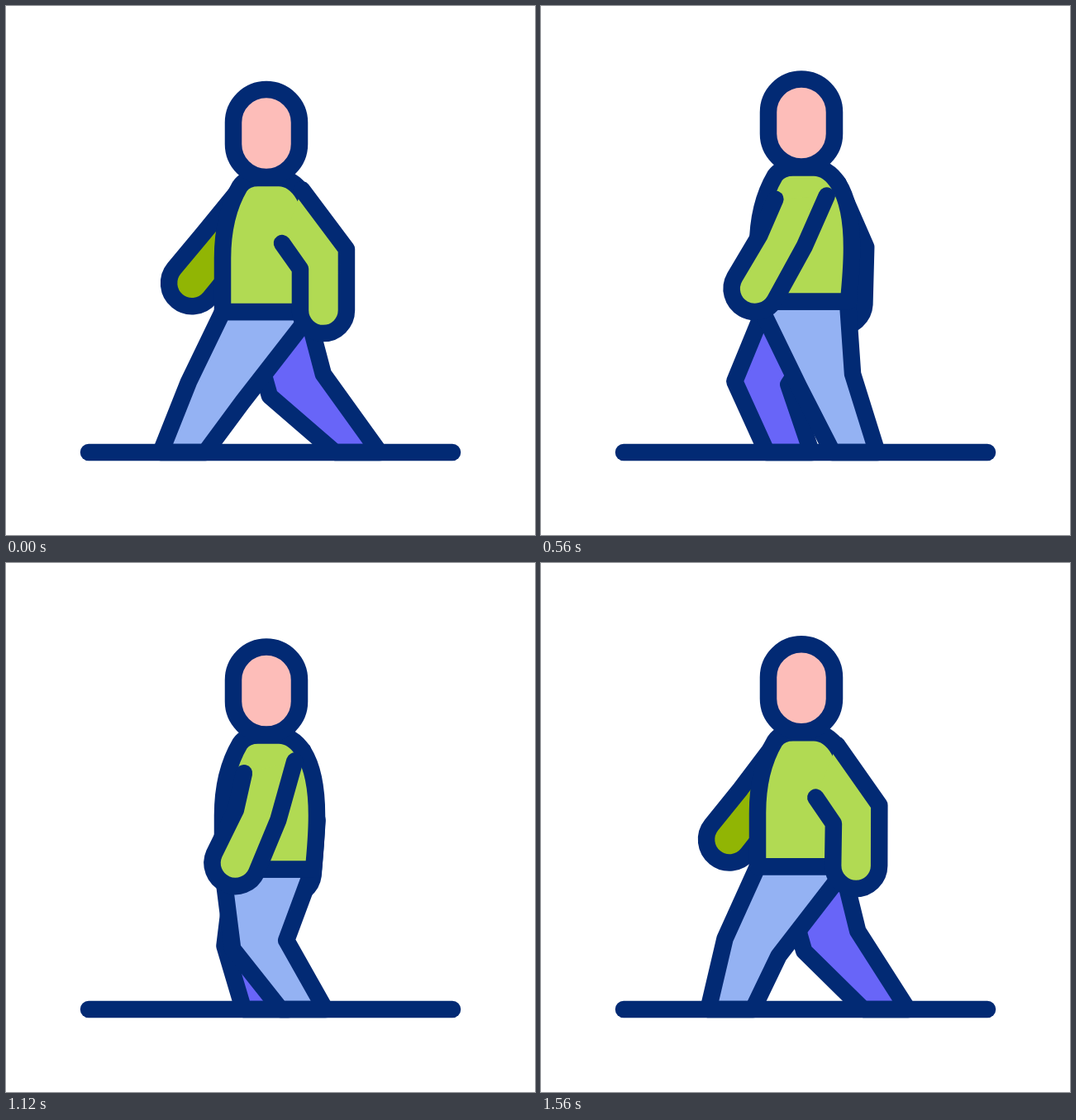
An HTML page with a canvas for the animation above (1600 ms loop, 640 by 640 pixels).

```html
<!DOCTYPE html>
<html>
<head>
<meta charset="utf-8">
<title>Walk cycle</title>
<style>
html, body { margin: 0; width: 100%; height: 100%; overflow: hidden; background: #fff; }
canvas { display: block; width: 100vmin; height: 100vmin; }
</style>
</head>
<body>
<canvas id="stage" width="640" height="640"></canvas>
<script>
const ctx = document.getElementById('stage').getContext('2d');
const LOOP = 1600, HALF = LOOP / 2, STEP = LOOP / 8;
const HIP_X = 316, HIP_Y = 370, GROUND = 540;
const INK = '#022a74', SKIN = '#fdbdb9';
const SHIRT = '#b1da53', SLEEVE = '#91b504', JEANS = '#94b2f3', FAR_JEANS = '#6865f8';

// Evenly spaced key positions of the walk, joined by straight moves
const bobKeys = [0, 12.7, -7.3, -13.8];
const footKeys = [214, 235, 366, 383, 425, 404, 330, 293];
const kneeKeys = [253, 242, 332, 347, 351, 334, 288, 261];

// Arm poses as x,y pairs: back elbow, front elbow, hand, back shoulder, front shoulder
const armFront = [356, 318, 412, 294, 384, 368, 334, 287, 358, 222];
const armMiddle = [301, 308, 350, 315, 309, 371, 298, 265, 354, 234];
const armBack = [246, 279, 306, 291, 234, 341, 279, 236, 340, 246];
const farShoulders = [283, 221, 359, 226];

function sample(keys, time) {
  const position = time / STEP, i = Math.floor(position), n = keys.length;
  return keys[i % n] + (keys[(i + 1) % n] - keys[i % n]) * (position - i);
}

// 0 when the arm is in front, 1 when it is behind
function swing(time) {
  const u = 1 - Math.abs(1 - time % LOOP / HALF);
  return 0.3 * u + 0.35 * (1 - Math.cos(Math.PI * u));
}

// Quadratic path through the three arm poses
function armPose(s) {
  return armFront.map((front, i) => (1 - s) * (1 - 2 * s) * front +
    4 * s * (1 - s) * armMiddle[i] + s * (2 * s - 1) * armBack[i]);
}

function paint(fill, path) {
  ctx.fillStyle = fill;
  ctx.fill(path);
  ctx.stroke(path);
}

function drawLeg(time, bob, isFar) {
  const foot = sample(footKeys, time), knee = sample(kneeKeys, time);
  const lean = foot - HIP_X, hip = HIP_Y + bob;
  const kneeY = 463 + 0.6 * bob - 0.04 * lean, tilt = 0.12 * lean;
  const backHip = isFar ? 276 + 0.13 * lean : 262;
  const frontHip = isFar ? 364 : 371;
  paint(isFar ? FAR_JEANS : JEANS, new Path2D(
    `M${backHip},${hip}L${knee - 32},${kneeY + tilt}L${foot - 27},${GROUND}` +
    `H${foot + 27}L${knee + 33},${kneeY - tilt}L${frontHip},${hip}Z`));
}

function drawArm([bx, by, fx, fy, hx, hy, bsx, bsy, fsx, fsy], fill) {
  const angle = Math.atan2(hy - (by + fy) / 2, hx - (bx + fx) / 2);
  const arm = new Path2D();
  arm.moveTo(fsx, fsy);
  arm.lineTo(fx, fy);
  arm.arc(hx, hy, 28, angle - Math.PI / 2, angle + Math.PI / 2);
  arm.lineTo(bx, by);
  arm.lineTo(bsx, bsy);
  paint(fill, arm);
}

const torso = new Path2D('M262,370V305C262,270 270,240 283,218Q290,208 305,208H330' +
  'C348,208 376,228 376,305C376,330 374,350 372,370Z');
const head = new Path2D('M275,141a40,40 0 0 1 80,0v26a40,40 0 0 1 -80,0Z');
const ground = new Path2D(`M100,${GROUND}H540`);

function draw(time) {
  const bob = sample(bobKeys, time);
  const near = swing(time), far = swing(time + HALF);
  ctx.fillStyle = '#fff';
  ctx.fillRect(0, 0, 640, 640);
  ctx.strokeStyle = INK;
  ctx.lineWidth = 20.5;
  ctx.lineJoin = ctx.lineCap = 'round';

  // The far arm reaches further back and stays longer in front
  const farSwing = 1.06 * far - 0.8 * far * (1 - far) ** 2;
  const nearSwing = near + 0.5 * near * near * (1 - near);

  ctx.save();
  ctx.translate(0, bob);
  drawArm([...armPose(farSwing).slice(0, 6), ...farShoulders], SLEEVE);
  ctx.restore();

  drawLeg(time + HALF, bob, true);
  drawLeg(time, bob, false);
  ctx.stroke(ground);

  ctx.save();
  ctx.translate(0, bob);
  paint(SHIRT, torso);
  drawArm(armPose(nearSwing), SHIRT);
  paint(SKIN, head);
  ctx.restore();
}

const start = performance.now();
function tick() {
  draw((performance.now() - start) % LOOP);
  requestAnimationFrame(tick);
}
tick();
</script>
</body>
</html>
```
